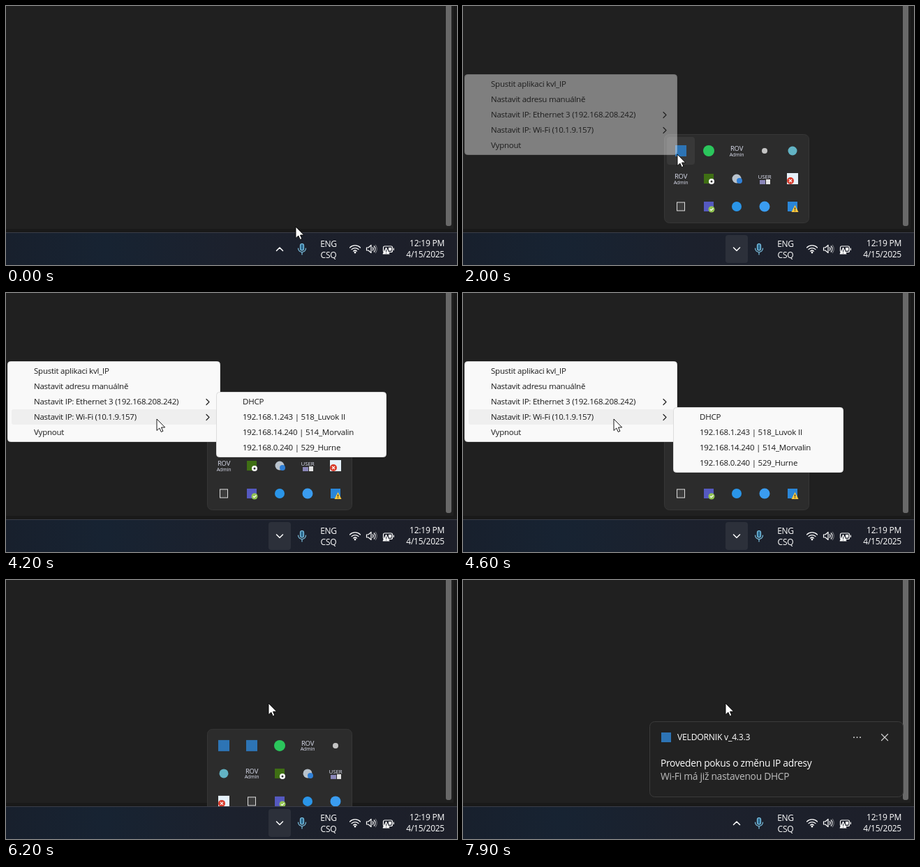
Recreate the animation shown at these times as an HTML page. Size 646 by 372 pixels, loop 8 s.

```html
<!DOCTYPE html>
<html lang="cs">
<head>
<meta charset="utf-8">
<title>Tray menu</title>
<style>
  html, body { margin: 0; width: 100%; height: 100%; overflow: hidden; background: #202020; }
  svg { display: block; width: 646px; height: 372px; }
  text { font: 12px "Open Sans", "Noto Sans", sans-serif; letter-spacing: -.02em; fill: #fff; }
  .menu text { font-size: 11.5px; fill: #1a1a1a; }
  .menu > rect:first-child { fill: #f9f9f9; stroke: #dcdcdc; }
  .hover { fill: #efefef; }
  .line { fill: none; stroke: #fff; stroke-width: 1.2; stroke-linecap: round; stroke-linejoin: round; }
  .dark { stroke: #222; }
  .toast .body { font-size: 13.8px; }
</style>
</head>
<body>
<svg viewBox="0 0 646 372">
  <defs>
    <linearGradient id="barFill">
      <stop offset="0" stop-color="#18202d"/>
      <stop offset=".22" stop-color="#172332"/>
      <stop offset=".5" stop-color="#1c212d"/>
      <stop offset="1" stop-color="#1d1f29"/>
    </linearGradient>
  </defs>

  <rect width="646" height="372" fill="#202020"/>
  <rect x="641" width="5" height="325" fill="#191919"/>
  <rect y="320" width="646" height="5" fill="#191919"/>
  <rect x="630" y="-8" width="8" height="324" rx="3" fill="#696969"/>

  <g id="tray"></g>

  <g id="toast" class="toast">
    <rect x="267.5" y="203.5" width="363" height="108" rx="7" fill="#222" stroke="#3b3b3b"/>
    <rect x="284" y="219" width="14" height="14" fill="#2d74b5"/>
    <text x="307" y="230" style="font-size:12.2px">VELDORNIK v_4.3.3</text>
    <g fill="#d0d0d0"><circle cx="560" cy="226" r="1"/><circle cx="564.5" cy="226" r="1"/><circle cx="569" cy="226" r="1"/></g>
    <path class="line" style="stroke:#d0d0d0" d="M599.5 221.5l9 9m0-9l-9 9"/>
    <text class="body" x="283" y="268">Proveden pokus o změnu IP adresy</text>
    <text class="body" x="283" y="287" style="fill:#bdbdbd">Wi-Fi má již nastavenou DHCP</text>
  </g>

  <rect y="325" width="646" height="47" fill="url(#barFill)"/>
  <rect y="325" width="646" height="1" fill="#3a3d48"/>
  <rect id="button" x="376" y="329" width="32" height="40" rx="4" fill="#2c303a"/>
  <path id="arrow" class="line" style="stroke-width:1.5"/>

  <g class="line" style="stroke:#7fc6e6">
    <rect x="421.5" y="341.5" width="5" height="9.5" rx="2.5" fill="#2f6d92"/>
    <path d="M418.5 348a5.5 5.5 0 0 0 11 0M424 353.5v3.5"/>
  </g>
  <g text-anchor="middle"><text x="462" y="346">ENG</text><text x="462" y="362">CSQ</text></g>
  <g class="line">
    <path d="M492.500 347a10.500 10.500 0 0 1 15 0M495 349.700a7 7 0 0 1 10 0M497.500 352.200a3.600 3.600 0 0 1 5 0"/>
    <circle cx="500" cy="354" r=".8" fill="#fff"/>
    <path d="M516.500 347h2.500l4-3.500v11l-4-3.500h-2.500zM525.300 347a3 3 0 0 1 0 4M527.300 345a6 6 0 0 1 0 8"/>
    <path d="M529.300 343.500a9 9 0 0 1 0 11" opacity=".4"/>
    <rect x="540.500" y="345" width="13" height="8.500" rx="2"/>
    <path d="M555.300 348v2.500"/>
    <path d="M544.500 347.500l-4.300 8.500h8.600z" fill="#fff"/>
    <path d="M544.500 350v3M544.500 355v.1" stroke="#1c212d" stroke-width="1"/>
    <rect x="548" y="347" width="4" height="4.500" fill="#fff" stroke="none"/>
  </g>
  <g text-anchor="end"><text x="628" y="345">12:19 PM</text><text x="628" y="361">4/15/2025</text></g>

  <g id="mainMenu" class="menu">
    <rect x="2.500" y="98.500" width="304" height="115" rx="4"/>
    <rect id="mainHover" class="hover" x="8" width="294" height="22" rx="3"/>
    <g id="mainItems"></g>
    <path class="line dark" d="M287 152.500l4 4l-4 4M287 174.500l4 4l-4 4"/>
  </g>
  <g id="subMenu" class="menu">
    <rect x="301.500" y=".5" width="243" height="93" rx="4"/>
    <rect id="subHover" class="hover" x="307" width="233" height="22" rx="3"/>
    <g id="subItems"></g>
  </g>
  <path id="cursor" d="M0 0V16.500L3.800 13L6.300 18.500L8.900 17.400L6.500 12H11.700Z" fill="#fff" stroke="#000" stroke-width=".9"/>
</svg>

<script>
const LOOP = 8000;
const $ = id => document.getElementById(id);
const [tray, toast, button, arrow, mainMenu, mainHover, subMenu, subHover, cursor] =
  ['tray', 'toast', 'button', 'arrow', 'mainMenu', 'mainHover', 'subMenu', 'subHover', 'cursor'].map($);

const list = (items, x, y) => items.map((s, i) => `<text x="${x}" y="${y + 22 * i}">${s}</text>`).join('');
$('mainItems').innerHTML = list(['Spustit aplikaci kvl_IP', 'Nastavit adresu manuálně',
  'Nastavit IP: Ethernet 3 (192.168.208.242)', 'Nastavit IP: Wi-Fi (10.1.9.157)', 'Vypnout'], 40, 116);
$('subItems').innerHTML = list(['DHCP', '192.168.1.243 | 518_Luvok II',
  '192.168.14.240 | 514_Morvalin', '192.168.0.240 | 529_Hurne'], 339, 18);

// Tray icons, each centred on its own origin
const square = (c, r = 7) => `<rect x="${-r}" y="${-r}" width="${2 * r}" height="${2 * r}" fill="${c}"/>`;
const disc = (c, r, x = 0, y = 0) => `<circle cx="${x}" cy="${y}" r="${r}" fill="${c}"/>`;
const mark = (d, c = '#fff') => `<path d="${d}" fill="none" stroke="${c}" stroke-width="1.2"/>`;
const label = (s, y, size) => `<text y="${y}" text-anchor="middle" style="font-size:${size}px;fill:#dde0f0">${s}</text>`;
const admin = label('ROV', 0, 9.5) + label('Admin', 7.5, 7);
const app = square('#2d74b5', 8);
const icons = [
  app, disc('#2bc65c', 8), admin, disc('#c4c4c4', 4), disc('#62b3c4', 6.5),
  admin, square('#3f6f14') + disc('#fff', 4, 4, 4) + disc('#333', 1.5, 4, 4),
  disc('#b9c3cd', 6.5) + disc('#2f7fd6', 4, 4, 3),
  label('USER', 0, 8) + '<rect x="-7" y="2" width="8" height="6" fill="#8a86b8"/><rect x="2" y="1" width="6" height="7" fill="#e4e4e4"/>',
  square('#e6f1fa', 8) + disc('#d83b2b', 5, -3, 3) + mark('M-5 1l4 4m0-4l-4 4'),
  '<rect x="-5.500" y="-6" width="11" height="12" fill="#3c3c3c" stroke="#ddd"/>',
  square('#5559c0') + disc('#92c353', 4.500, 4, 4) + mark('M2 4l1.500 1.500l3-3'),
  disc('#2a95e8', 7), disc('#3a9cf0', 7.500),
  square('#2a86d8') + '<path d="M3.500 -2L-1.500 8H8.500Z" fill="#ffc83d"/>' + mark('M3.500 1.500v3M3.500 5.500v1.300', '#222')
];

function panel(items) {
  const rows = Math.ceil(items.length / 5);
  return `<rect x="288.500" y=".5" width="207" height="${rows * 40 + 7}" rx="7" fill="#2c2c2c" stroke="#363636"/>` +
    '<rect class="tile" x="292" y="4" width="40" height="40" rx="4" fill="#383838"/>' +
    items.map((s, i) => `<g transform="translate(${312 + i % 5 * 40} ${24 + Math.floor(i / 5) * 40})">${s}</g>`).join('');
}
tray.innerHTML = `<g>${panel(icons)}</g><g>${panel([app, ...icons])}</g>`;
const [trayBefore, trayAfter] = tray.children;
const tile = trayBefore.querySelector('.tile');
trayAfter.querySelector('.tile').remove();

// Pointer stops: time, x, y
const stops = [[100, 415, 317], [500, 391, 349], [950, 391, 349], [1600, 307, 213], [2300, 307, 213],
  [3000, 243, 155], [3750, 243, 155], [4150, 216, 181], [4750, 216, 181], [5550, 376, 177]];

const ramp = (t, from, to) => Math.min(1, Math.max(0, (t - from) / (to - from)));
const easeOut = p => 1 - (1 - p) ** 3;
const show = (el, on) => el.setAttribute('visibility', on ? 'visible' : 'hidden');
const move = (el, x, y) => el.setAttribute('transform', `translate(${x} ${y})`);

function pointer(t) {
  const i = stops.findIndex(s => s[0] > t);
  if (i === 0) return stops[0].slice(1);
  if (i < 0) return stops.at(-1).slice(1);
  const [t0, x0, y0] = stops[i - 1], [t1, x1, y1] = stops[i];
  const p = ramp(t, t0, t1), e = p * p * (3 - 2 * p);
  return [x0 + (x1 - x0) * e, y0 + (y1 - y0) * e];
}

function draw(t) {
  const [x, y] = pointer(t);
  move(cursor, x, y);

  const open = t >= 600 && t < 6400;
  show(button, open);
  arrow.setAttribute('d', open ? 'M387.500 347l4.500 4.500l4.500-4.500' : 'M387.500 351.500l4.500-4.500l4.500 4.500');

  const closing = t >= 6050;
  show(trayBefore, open && !closing);
  show(trayAfter, open && closing);
  move(trayBefore, 0, 325 - 141 * easeOut(ramp(t, 600, 1030)));
  move(trayAfter, 0, 144 + 181 * ramp(t, 6050, 6293) ** 2);
  show(tile, open && !closing && t > 1000 && x > 292 && x < 332 && y > 188 && y < 228);

  const menuOpen = t >= 1900 && t < 5950;
  const subOpen = t >= 3500 && t < 5950;
  const subTop = t < 4500 ? 142 : 164;
  const inSub = subOpen && x > 302;
  const row = inSub ? 3 : Math.floor((y - 101) / 22);
  show(mainMenu, menuOpen);
  mainMenu.setAttribute('opacity', ramp(t, 1915, 2110));
  show(mainHover, menuOpen && x < 307 + 240 * inSub && row >= 0 && row < 5);
  mainHover.setAttribute('y', 101 + 22 * row);

  show(subMenu, subOpen);
  subMenu.setAttribute('opacity', t < 4500 ? ramp(t, 3480, 3600) : ramp(t, 4480, 4600));
  move(subMenu, 0, subTop);
  show(subHover, inSub);
  subHover.setAttribute('y', 3 + 22 * Math.floor((y - subTop - 3) / 22));

  show(toast, t >= 6600);
  move(toast, 380 * (1 - easeOut(ramp(t, 6600, 7200))), 0);
}

function frame() {
  draw(performance.now() % LOOP);
  requestAnimationFrame(frame);
}
frame();
</script>
</body>
</html>
```
